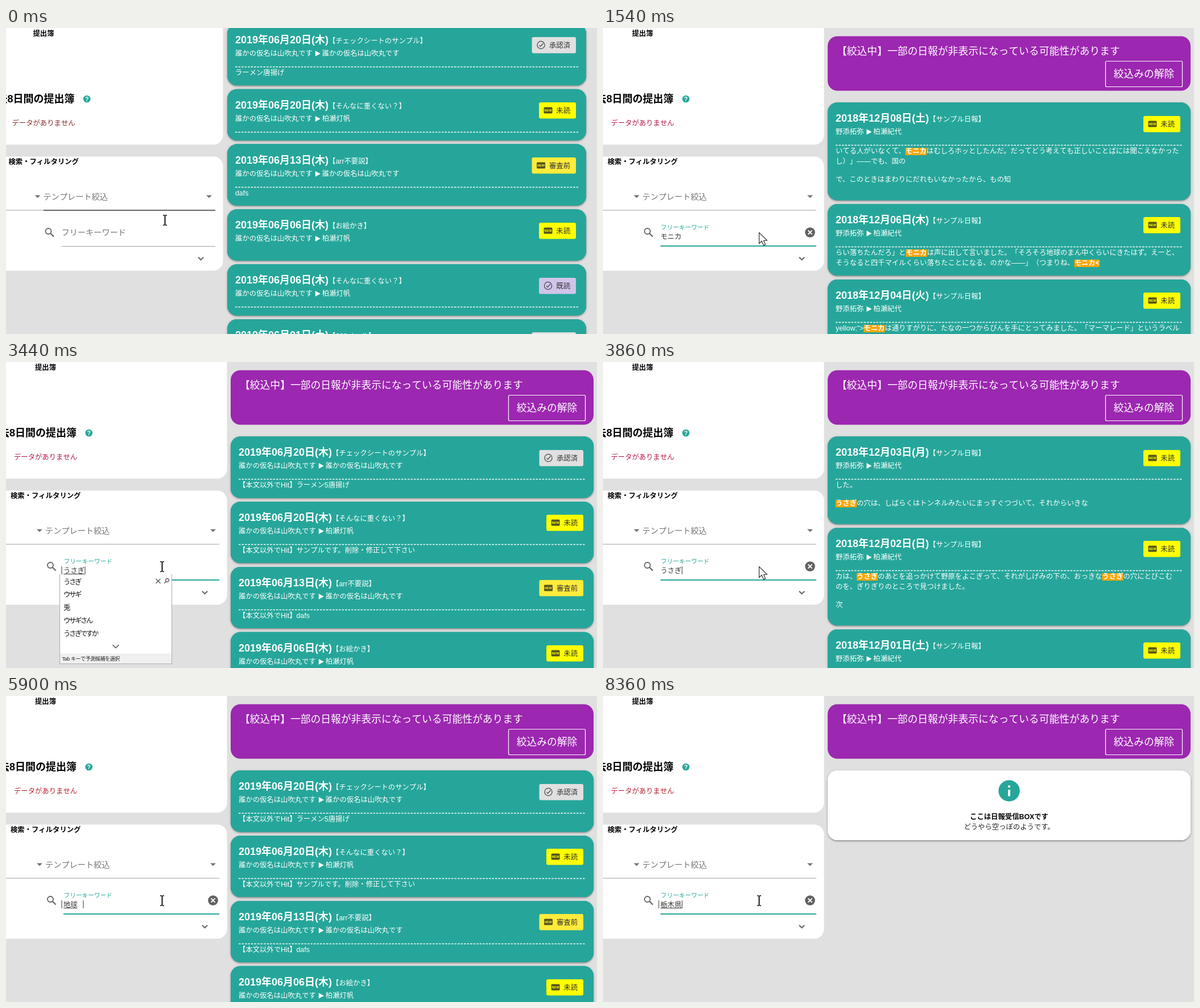
These frames come from a looping animation (1039x539 px, 9.36 s). An HTML page with a canvas:

```html
<!DOCTYPE html>
<html lang="ja">
<head>
<meta charset="utf-8">
<style>
html, body { margin: 0; width: 100%; height: 100%; overflow: hidden; background: #e0e0e0; }
canvas { display: block; }
</style>
</head>
<body>
<canvas id="stage" width="1039" height="539"></canvas>
<script>
const ctx = document.getElementById('stage').getContext('2d');
const LOOP = 9360, SIZE = 12.35;
const FAMILY = '"Liberation Sans", "Noto Sans CJK JP", sans-serif';
const TEAL = '#26a69a', GREY = '#757575';

const ME = '誰かの仮名は山吹丸です', BOSS = '柏瀬灯帆', STAFF = '野添拓弥', LEAD = '柏瀬紀代';
const BADGES = {
  未読: '#ffff00', 審査前: '#ffeb3b', 承認済: '#e0e0e0', 既読: '#d1c4e9'
};

// An empty body line is a paragraph gap; *text* is highlighted.
const card = (date, title, from, to, badge, ...body) => ({ date, title, from, to, badge, body });
const sample = (date, ...body) => card(date, 'サンプル日報', STAFF, LEAD, '未読', ...body);
const reports = (...bodies) => [
  card('2019年06月20日(木)', 'チェックシートのサンプル', ME, ME, '承認済', ...bodies[0]),
  card('2019年06月20日(木)', 'そんなに重くない？', ME, BOSS, '未読', ...bodies[1]),
  card('2019年06月13日(木)', 'arr不要説', ME, ME, '審査前', ...bodies[2]),
  card('2019年06月06日(木)', 'お絵かき', ME, BOSS, '未読', ...bodies[3]),
  card('2019年06月06日(木)', 'そんなに重くない？', ME, BOSS, '既読'),
  card('2019年06月01日(土)', '222メール', ME, ME, '承認済')
];
const HIT = '【本文以外でHit】';

const LISTS = {
  all: reports(['ラーメン唐揚げ'], [], ['dafs'], []),
  other: reports([HIT + 'ラーメン5唐揚げ'], [HIT + 'サンプルです。削除・修正して下さい'], [HIT + 'dafs'], [HIT]),
  monica: [
    sample('2018年12月08日(土)',
      'いてる人がいなくて、*モニカ*はむしろホッとしたんだ。だってどう考えても正しいことばには聞こえなかった',
      'し）」――でも、国の', '', 'で、このときはまわりにだれもいなかったから、もの知', ''),
    sample('2018年12月06日(木)',
      'らい落ちたんだろ」と*モニカ*は声に出して言いました。「そろそろ地球のまん中くらいにきたはず。えーと、',
      'そうなると四千マイルくらい落ちたことになる、のかな――」（つまりね、*モニカ<*'),
    sample('2018年12月04日(火)',
      'yellow;">*モニカ*は通りすがりに、たなの一つからびんを手にとってみました。「マーマレード」というラベル', '')
  ],
  rabbit: [
    sample('2018年12月03日(月)', 'した。', '',
      '*うさぎ*の穴は、しばらくはトンネルみたいにまっすぐつづいて、それからいきな', ''),
    sample('2018年12月02日(日)',
      'カは、*うさぎ*のあとを追っかけて野原をよこぎって、それがしげみの下の、おっきな*うさぎ*の穴にとびこむ',
      'のを、ぎりぎりのところで見つけました。', '', '次', ''),
    sample('2018年12月01日(土)', '')
  ],
  earth: [
    sample('2018年12月08日(土)', 'めました。「このまま*地球*をドンッとつきぬけて落ちちゃうのかな！', ''),
    sample('2018年12月06日(木)',
      'いました。「そろそろ*地球*のまん中くらいにきたはず。えーと、そうなると四千マイルくらい落ちたことにな',
      'る、のかな――」（つまりね、モニカは教室の授業で、こんなようなことをいくつか勉強して'),
    card('2018年11月22日(木)', '作業日報', LEAD, 'Fuzzy', '未読', 'p>',
      '「このまま*地球*をドンッとつきぬけて落ちちゃうのかな！　頭を下にして歩く人たちのなかに出てきたら、す',
      'っごくおかしく見えるでしょうね！　それってたとえば日本とかだとあるぜん人、')
  ]
};

const POPUPS = {
  monica: ['モニカ', 'もにか', 'モニター', 'もにもに', '喪に'],
  rabbit: ['うさぎ', 'ウサギ', '兎', 'ウサギさん', 'うさぎですか'],
  u: ['うち', '上', '受付', '海', '打ち合わせ'],
  earth: ['地球', '抽出', '重複', '駐車場', '中国'],
  tochigi: ['栃木県', 'と', '問い合わせ', '東京', '東京都']
};

// Each step overrides the values that change from that time on.
const STEPS = [
  [0, { wide: false, list: 'all', text: '', focus: false, popup: '', compose: false, clear: false,
        arrow: false, carets: [], mouse: [279, 338], hover: true, alert: '#8a2c2c' }],
  [140, { mouse: [274, 360], hover: false }],
  [280, { focus: true, carets: [101] }],
  [420, { text: 'も', compose: true, popup: 'monica', carets: [114] }],
  [700, { text: 'もに', carets: [126] }],
  [840, { text: 'もにか', carets: [138.5] }],
  [980, { text: 'モニカ' }],
  [1120, { popup: '' }],
  [1260, { wide: true, list: 'other', clear: true, alert: '#b31945' }],
  [1540, { list: 'monica', compose: false, carets: [], arrow: true }],
  [1680, { wide: false, carets: [138.5] }],
  [1960, { carets: [] }],
  [2460, { text: '', arrow: false, carets: [101] }],
  [2600, { text: 'う', compose: true, popup: 'u', carets: [98, 114] }],
  [2880, { wide: true, list: 'other', clear: false, text: 'うs' }],
  [3020, { text: 'うさ', popup: 'rabbit', carets: [98, 126] }],
  [3300, { text: 'うさぎ', carets: [98, 138.5] }],
  [3720, { popup: '', clear: true }],
  [3860, { list: 'rabbit', compose: false, arrow: true, carets: [138.5] }],
  [4360, { wide: false, arrow: false }],
  [4640, { text: '', carets: [101, 138.5] }],
  [4780, { text: 'ち', compose: true, popup: 'earth', carets: [113.5, 139] }],
  [5200, { wide: true, list: 'other', clear: false, text: 'ちk', carets: [98, 120], alert: '#b71c2c' }],
  [5340, { text: 'ちき', carets: [98, 126] }],
  [5480, { text: 'ちきゅ', carets: [98, 138.5] }],
  [5620, { text: 'ちきゅう', carets: [98, 151] }],
  [5760, { text: '地球', carets: [98, 136] }],
  [5900, { popup: '', clear: true }],
  [6040, { list: 'earth', compose: false, arrow: true, carets: [126] }],
  [6540, { arrow: false }],
  [6820, { text: '', carets: [98, 127, 136] }],
  [6960, { text: 't', compose: true, carets: [98, 105, 127, 136] }],
  [7100, { text: 'と', popup: 'tochigi', carets: [98, 113, 127, 136] }],
  [7380, { list: 'other', clear: false, text: 'とt', carets: [98, 118] }],
  [7520, { text: 'とち', carets: [98, 126] }],
  [7660, { text: '栃木県', carets: [98, 139] }],
  [7800, { popup: '' }],
  [7940, { clear: true }],
  [8360, { list: 'empty' }]
];

function stateAt(time) {
  return Object.assign({}, ...STEPS.filter(([start]) => start <= time).map(([, change]) => change));
}

function label(str, x, y, color, size = SIZE, weight = 400, align = 'left') {
  ctx.font = `${weight} ${size}px ${FAMILY}`;
  ctx.fillStyle = color;
  ctx.textAlign = align;
  ctx.fillText(str, x, y);
  return ctx.measureText(str).width;
}

// Draws neighbouring punctuation apart, so that it keeps its full width.
function fullWidthLabel(str, x, y, color, size, weight) {
  let width = 0;
  for (const part of str.split(/(?<=[、。」）！？　])(?=[「」（）】　])/)) {
    width += label(part, x + width, y, color, size, weight);
  }
  return width;
}

function rect(x, y, w, h, color) {
  ctx.fillStyle = color;
  ctx.fillRect(x, y, w, h);
}

function box(x, y, w, h, r, color, shadows = []) {
  ctx.save();
  ctx.fillStyle = color;
  ctx.beginPath();
  ctx.roundRect(x, y, w, h, r);
  for (const [offset, blur, alpha] of shadows) {
    ctx.shadowColor = `rgba(0,0,0,${alpha})`;
    ctx.shadowBlur = blur;
    ctx.shadowOffsetY = offset;
    ctx.fill();
  }
  ctx.shadowColor = 'transparent';
  ctx.fill();
  ctx.restore();
}
const RAISED = [[1, 5, .2], [2, 2, .22]];

function shape(points, fill, stroke, width = 1) {
  ctx.beginPath();
  points.forEach(([x, y]) => ctx.lineTo(x, y));
  if (fill) {
    ctx.closePath();
    ctx.fillStyle = fill;
    ctx.fill();
  }
  if (stroke) {
    ctx.strokeStyle = stroke;
    ctx.lineWidth = width;
    ctx.stroke();
  }
}

function circle(x, y, r, fill, stroke, width = 1) {
  ctx.beginPath();
  ctx.arc(x, y, r, 0, 7);
  if (fill) { ctx.fillStyle = fill; ctx.fill(); }
  if (stroke) { ctx.strokeStyle = stroke; ctx.lineWidth = width; ctx.stroke(); }
}

function cross(x, y, r, color, width) {
  shape([[x - r, y - r], [x + r, y + r]], null, color, width);
  shape([[x + r, y - r], [x - r, y + r]], null, color, width);
}

const chevron = (x, y, w, color) =>
  shape([[x - w, y - w / 2], [x, y + w / 2], [x + w, y - w / 2]], null, color, w > 5 ? 1.1 : 2);
const dropArrow = (x, y) => shape([[x - 5, y - 2], [x + 5, y - 2], [x, y + 3]], GREY);

function drawBadge(kind, right, y) {
  const w = kind.length === 3 ? 77.5 : 65, x = right - w, cx = x + 16, cy = y + 14;
  box(x, y, w, 28.5, 3, BADGES[kind]);
  if (kind === '承認済' || kind === '既読') {
    circle(cx, cy, 6.6, null, '#444', 1.2);
    shape([[cx - 3, cy], [cx - 1, cy + 2.5], [cx + 4, cy - 3]], null, '#444', 1.2);
  } else {
    box(cx - 7.5, cy - 5.5, 15, 11, 1.5, '#55551a');
    label('NEW', cx, cy + 2.2, BADGES[kind], 5.5, 700, 'center');
  }
  label(kind, right - 10, y + 18.5, '#333', SIZE, 400, 'right');
}

function drawBodyLine(line, x, y) {
  line.split('*').forEach((part, i) => {
    const weight = i % 2 ? 700 : 400;
    if (i % 2) {
      ctx.font = `700 ${SIZE}px ${FAMILY}`;
      rect(x, Math.round(y - 10.5), ctx.measureText(part).width, 13, '#ffa500');
    }
    x += fullWidthLabel(part, x, y, '#fff', SIZE, weight);
  });
}

const lineHeight = line => line ? 18 : 14;

function drawCard(item, left, right, exactTop) {
  const height = 90 + item.body.reduce((sum, line) => sum + lineHeight(line), 0);
  const x = left + 14, top = Math.round(exactTop);
  box(left, exactTop, right - left, height, 17, TEAL, RAISED);
  const dateWidth = label(item.date, x, top + 34, '#fff', 18, 700);
  fullWidthLabel(`【${item.title}】`, x + dateWidth, top + 34, '#fff');
  const end = x + label(item.from, x, top + 56, '#fff');
  shape([[end + 5, top + 47], [end + 14, top + 52], [end + 5, top + 57]], '#fff');
  label(item.to, end + 17, top + 56, '#fff');
  drawBadge(item.badge, right - 18, Math.round(exactTop + 23.3));
  if (item.body.length || item.title !== 'お絵かき') {
    ctx.setLineDash([3.5, 2]);
    shape([[x, top + 75.5], [right - 14, top + 75.5]], null, '#fff', 1.3);
    ctx.setLineDash([]);
  }
  let y = top + 90;
  for (const line of item.body) {
    drawBodyLine(line, x, y);
    y += lineHeight(line);
  }
  return exactTop + height + 6.8;
}

function drawList(s) {
  const [left, right] = s.wide ? [395, 1033] : [389, 1020];
  if (s.list !== 'all') {
    box(left, 14.5, right - left, 96, 17, '#9c27b0');
    label('【絞込中】一部の日報が非表示になっている可能性があります', left + 16, 47, '#fff', 17.8);
    ctx.strokeStyle = '#fff';
    ctx.lineWidth = 1.2;
    ctx.beginPath();
    ctx.roundRect(right - 149.5, 58.5, 135, 45, 2);
    ctx.stroke();
    label('絞込みの解除', right - 82, 87, '#fff', 17.8, 400, 'center');
  }
  if (s.list === 'empty') {
    const cx = (left + right) / 2;
    box(left, 131.5, right - left, 122.5, 17, '#fff', RAISED);
    circle(cx, 167, 18.7, TEAL);
    rect(cx - 1.9, 157.5, 3.8, 3.8, '#fff');
    rect(cx - 1.9, 165, 3.8, 11.5, '#fff');
    label('ここは日報受信BOXです', cx, 217, '#000', SIZE, 700, 'center');
    label('どうやら空っぽのようです。', cx, 234.5, '#222', SIZE, 400, 'center');
    return;
  }
  let top = s.list === 'all' ? -7 : 131.3;
  for (const item of LISTS[s.list]) {
    if (top < 539) top = drawCard(item, left, right, top);
  }
}

function drawPanels(s, d) {
  const edge = 388.5 + 2 * d, end = 375 + 2 * d;
  box(-30, -30, edge + 30, 235.5, 17, '#fff');
  box(-30, 226.5, edge + 30, 201, 17, '#fff');
  label('提出簿', 51 + d, 13.5, '#000', SIZE, 700);
  label('去8日間の提出簿', 124 + d, 130.5, '#000', 18, 700, 'right');
  circle(145.7 + d, 125, 6.3, TEAL);
  label('?', 145.7 + d, 128.8, '#fff', 10.5, 700, 'center');
  label('データがありません', 14 + d, 172, s.alert);
  label('検索・フィルタリング', 8 + d, 239.5, '#000', SIZE, 700);

  dropArrow(59 + d, 296.5);
  label('テンプレート絞込', 69 + d, 301.5, GREY, 14.2);
  dropArrow(364 + 2 * d, 296.5);
  rect(0, 320.5, end, 1, '#a0a0a0');
  if (s.hover) rect(69.5 + d, 320.5, end - 69.5 - d, 1.2, '#222');

  circle(78 + d, 358, 5, null, '#666', 1.9);
  shape([[81.5 + d, 361.5], [87.5 + d, 367.5]], null, '#666', 2.3);
  if (s.focus) {
    label('フリーキーワード', 101.5 + d, 354.5, TEAL, 10.7);
    rect(101 + d, 383, end - 101 - d, 2, TEAL);
  } else {
    label('フリーキーワード', 101 + d, 364.5, GREY, 14.2);
    rect(101 + d, 384, end - 101 - d, 1, '#a0a0a0');
  }
  chevron(349.5 + 2 * d, 406, 4.6, '#666');
  const width = label(s.text, 101 + d, 371.5, '#333');
  if (s.compose) rect(101 + d, 373, width, 1, '#333');
  for (const x of s.carets) rect(Math.round(x + d) - .5, 360, 1, 14, '#333');
  if (s.clear) {
    circle(364 + 2 * d, 360, 8.8, '#616161');
    cross(364 + 2 * d, 360, 3.6, '#fff', 1.9);
  }
}

function drawPopup(items, d) {
  const x = Math.round(94 + d);
  rect(x, 374, 198, 158, '#aaa');
  rect(x + 1, 374, 196, 157, '#fff');
  rect(x + 1, 513.5, 196, 17, '#f0f0f0');
  items.forEach((item, i) => {
    ctx.letterSpacing = /^[ぁ-ヿ]{2,}$/.test(item) ? '-2.4px' : '0px';
    label(item, x + 7, 391.5 + i * 22.9, '#111');
  });
  ctx.letterSpacing = '-0.4px';
  label('Tab キーで予測候補を選択', x + 4.5, 525.5, '#222', 9);
  ctx.letterSpacing = '0px';
  cross(x + 173.5, 386, 4, '#444', 1.1);
  circle(x + 189.5, 384.5, 2.9, null, '#444', 1.1);
  shape([[x + 187.5, 386.5], [x + 184, 390]], null, '#444', 1.1);
  chevron(x + 99, 501, 5.5, '#333');
}

function drawMouse([x, y], arrow) {
  if (arrow) {
    shape([[0, 0], [0, 19], [4.5, 15], [8, 22.5], [11, 21], [8, 14], [14, 13.5], [0, 0]]
      .map(([px, py]) => [x + .5 + px, y + .5 + py]), '#fff', '#222', 1.1);
    return;
  }
  rect(x - .5, y - 8, 2, 17, '#111');
  for (const end of [-9, 8.5]) {
    rect(x - 3, y + end, 3, 1.5, '#111');
    rect(x + 1, y + end, 3, 1.5, '#111');
  }
}

function draw(now) {
  const s = stateAt(now % LOOP), d = s.wide ? 0 : -3.5;
  rect(0, 0, 1039, 539, '#e0e0e0');
  drawPanels(s, d);
  drawList(s);
  if (s.popup) drawPopup(POPUPS[s.popup], d);
  drawMouse(s.mouse, s.arrow);
}

const began = performance.now();
function tick() {
  draw(performance.now() - began);
  requestAnimationFrame(tick);
}
tick();
</script>
</body>
</html>
```
